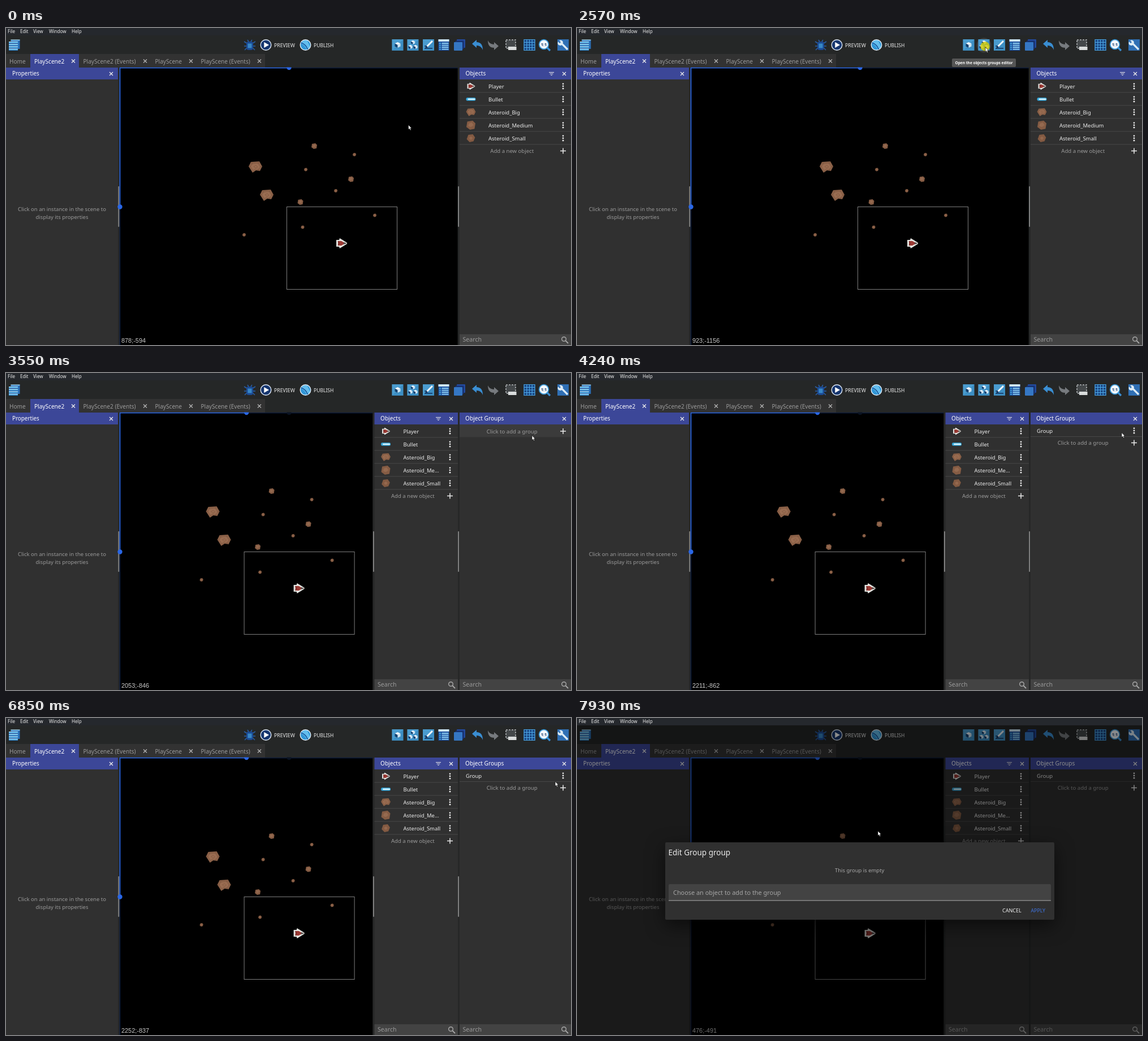
Recreate the animation shown at these times as an HTML page. Size 999 by 561 pixels, loop 8 s.

```html
<!DOCTYPE html>
<html lang="en">
<head>
<meta charset="utf-8">
<title>Scene editor</title>
<style>
html, body { margin: 0; width: 100%; height: 100%; overflow: hidden; background: #252727; }
svg { display: block; width: 999px; height: 561px; }
text { font-family: "Noto Sans", "Open Sans", sans-serif; white-space: pre; }
#coords { font-family: "Liberation Sans", Arial, sans-serif; }
</style>
</head>
<body>
<svg id="stage" viewBox="0 0 999 561" xmlns="http://www.w3.org/2000/svg"></svg>
<script>
const LOOP = 8000;
const WHITE = '#ececec', GREY = '#9b9b9b', PANEL = '#303030', GAP = '#272828', HEAD = '#3c4798';
const BLUE = '#2a67e6', RAIL = '#0d1c3c', SKY = '#4aa9e0', NAVY = '#1d3f8c';

// ---- drawing helpers ----
const rect = (x, y, w, h, fill, more = '') => `<rect x="${x}" y="${y}" width="${w}" height="${h}" fill="${fill}" ${more}/>`;
const circle = (x, y, r, fill, more = '') => `<circle cx="${x}" cy="${y}" r="${r}" fill="${fill}" ${more}/>`;
const shape = (d, fill, more = '') => `<path d="${d}" fill="${fill}" ${more}/>`;
const line = (d, color, w = 1.3, more = '') => `<path d="${d}" fill="none" stroke="${color}" stroke-width="${w}" ${more}/>`;
const text = (x, y, size, fill, s, more = '') => `<text x="${x}" y="${y}" font-size="${size}" fill="${fill}" ${more}>${s}</text>`;
const mid = (x, y, size, fill, s, more = '') => text(x, y, size, fill, s, `text-anchor="middle" ${more}`);
const at = (x, y, body, scale = 1) => `<g transform="translate(${x} ${y}) scale(${scale})">${body}</g>`;

const cross = (x, y, color = WHITE) => at(x, y, line('M-3-3 3 3M3-3-3 3', color));
const plus = (x, y) => at(x, y, line('M-5 0H5M0-5V5', WHITE, 1.5));
const dots = (x, y) => at(x, y, [-4.2, 0, 4.2].map(d => circle(0, d, 1.4, WHITE)).join(''));
const loupe = (x, y) => at(x, y, circle(-1.5, -1.5, 3.8, 'none', 'stroke="#aaa" stroke-width="1.4"') + line('M1.4 1.4 6 6', '#aaa', 1.8));
const filter = (x, y) => at(x, y, line('M-4.5-2.5H4.5M-3 0H3M-1.2 2.5H1.2', WHITE, 1.2));
const header = (x, w) => rect(x, 70, w, 21, HEAD);
const grip = x => rect(x, 280, 1.8, 72, '#8a8a8a', 'rx=".9"');

// ---- game sprites ----
const big = shape('M-8-9 7-10 12-1 8 7 1 6-5 10-12-1Z', '#8b6148') +
  shape('M-5-5 4-6 8 0 4 4 0 3-4 5-8-1Z', '#9a6d52') + line('M-8-9-5-5M7-10 4-6M12-1 8 0M-12-1-8-1M8 7 4 4', '#76503a', .8) +
  line('M-3-1 1-3 4 0 0 2Z', '#7f573f', .8);
const rock = shape('M-4-4 2-5 5-2 4 4-1 5-5 2Z', '#855c44') + shape('M-2-2 1-3 3 0 0 2-3 1Z', '#956a50');
const pebble = shape('M-2-2.6 1.5-3 3.2-.5 2 2.4-1 3-3.2.8Z', '#835a42') + circle(0, 0, 1.2, '#94684e');
const ship = shape('M-9-6-4-6-3-9 2-6 10-1V1L2 6-3 9-4 6-9 6Z', '#e4e4e0') + shape('M-6-4H0L7 0 0 4H-6Z', '#9c3a34') +
  line('M-6-4-4 0-6 4', '#5c2424', 1) + shape('M4-2 10 0 4 2Z', '#55504e');
const bullet = rect(-8.5, -2.8, 17, 5.6, '#35a8dc', 'rx="2.4"') + rect(-5.5, -1.3, 13, 2.6, '#def5ff', 'rx="1.3"');

const world =
  [[441, 246], [461, 296]].map(p => at(...p, big)).join('') +
  [[545, 209], [610, 267.5], [520.5, 308]].map(p => at(...p, rock)).join('') +
  [[616, 224], [530, 250.5], [583, 288], [652, 331.5], [524.5, 352.5], [421, 366]].map(p => at(...p, pebble)).join('') +
  rect(496.5, 316.5, 195, 146, 'none', 'stroke="#7e7e7e"') + at(593, 381, ship);

// ---- toolbar ----
const cube = (x, y, s) => at(x, y, shape('M0-4 4-2 0 0-4-2Z', '#f2f8fc') + shape('M-4-2 0 0V4L-4 2Z', '#17406e') + shape('M4-2 0 0V4L4 2Z', '#cfe4f2'), s);
const tile = rect(-10, -10, 20, 20, '#3d8fc4') + shape('M-10-10H10L-10 10Z', '#58a9da', 'opacity=".5"');
const tools = [
  [14.5, 30, rect(-6, -9, 16, 16, '#2a70ba') + rect(-9.5, -6, 16, 16, NAVY) + [-6, -1.8, 2.4, 6.6].map(y => rect(-9.5, y, 16, 3, SKY) + rect(-9.5, y, 16, 1, '#c4e8fa')).join('') + rect(-6, -9.5, 16, 1.6, '#9fd8f6')],
  [431, 30, line('M-10-6-5-3M10-6 5-3M-10 2H10M-9 9-5 5M9 9 5 5M-4-9-2-6M4-9 2-6', '#2a5fa8', 1.5) + rect(-6, -6, 12, 15, '#1b4a94', 'rx="4"') + rect(-3.5, -2.5, 7, 8, '#3787c6')],
  [459.5, 30, circle(0, 0, 9.3, '#16366f', 'stroke="#dfe9f5" stroke-width="1.4"') + shape('M-3.2-5 5.5 0-3.2 5Z', '#fff')],
  [529.5, 30, circle(0, 0, 9.3, '#2f95d6', 'stroke="#e4eef6" stroke-width="1.4"') + shape('M-8-3Q-4-9 3-8L8 3Q6 7 2 8Q-1 1-8-3Z', '#63bdec') + line('M-8-4Q1-1 4 8', '#17539c', 1.6)],
  [692.5, 30, tile + cube(0, 0, 1.25)],
  [719.5, 30, tile + cube(0, -4.5, .9) + cube(-4.5, 3.5, .9) + cube(4.5, 3.5, .9)],
  [747, 30, tile + line('M-7 6H7M-7 2H-2', '#12325e', 1.6) + line('M-3 3 7-7', '#f0f6fa', 3) + shape('M-6 6-4 1-1 4Z', '#12325e')],
  [774, 30, rect(-9.5, -10, 19, 20, '#1a4d9c') + rect(-9.5, -10, 19, 4, '#cfe9f8') + [-4, -.5, 3, 6.5].map(y => rect(-8, y, 3, 2, SKY) + rect(-3.5, y, 12, 2, '#8fd0f2')).join('')],
  [802, 30, rect(-5, -10, 15, 15, '#234a9e', 'rx="1"') + rect(-7.5, -7.5, 15, 15, '#16306e', 'rx="1"') + rect(-10, -5, 15, 15, '#3577c4', 'rx="1"')],
  [834, 30, shape('M-10-2-2-9V-5Q9-5 9 9Q6 1-2 1V5Z', '#3a8ed2')],
  [861, 30, shape('M10 2 2 9V5Q-9 5-9-8Q-6-1 2-1V-5Z', '#767a7e')],
  [893, 30, rect(-9, -9, 17, 15, '#44484a', 'stroke="#b4b8ba" stroke-width="1.5" stroke-dasharray="3 2"') + rect(-5, 3, 14.5, 6, '#d9dcdc')],
  [925.5, 30, rect(-10, -10, 20, 20, '#17427f') + line('M-10-9.5H10M-10-4.7H10M-10 0H10M-10 4.7H10M-10 9.5H10M-9.5-10V10M-4.7-10V10M0-10V10M4.7-10V10M9.5-10V10', '#4ba4e2', 1.2)],
  [952, 30, line('M5 5 10 10', '#3a8ed2', 3.4) + circle(-1, -1, 8.3, '#f4f8fb', 'stroke="#3a9ada" stroke-width="1.8"') + mid(-1, 1.8, 7.5, '#173a68', '1:1', 'font-weight="700"')],
  [985, 30, rect(-10, -10, 20, 20, '#2f6fb4') + line('M-2-2 8 8', '#dcebf5', 3.2) + shape('M0-5Q-2-10-7-8L-4-5-6-3-9-6Q-11 0-5 1Q-1 1 0-5Z', '#dcebf5')]
];

const menubar = [['File', 3], ['Edit', 25], ['View', 48], ['Window', 76], ['Help', 116]].map(([s, x]) => text(x, 9, 8.1, WHITE, s)).join('');
const tabs = [['PlayScene2 (Events)', 136.5, 246], ['PlayScene', 263.5, 327], ['PlayScene (Events)', 344.5, 448]]
  .map(([s, x, c]) => text(x, 62.5, 10.1, GREY, s) + cross(c, 58.5, '#b5b5b5')).join('');

const chrome = rect(0, 0, 999, 13, '#25282d') + rect(0, 13, 999, 57, '#252727') + menubar +
  rect(0, 46, 458, 24, '#323232') + rect(43, 46, 86, 24, HEAD) +
  text(6, 62.5, 10.1, GREY, 'Home') + text(50, 62.5, 10.1, '#fff', 'PlayScene2') + cross(119, 58.5) + tabs +
  `<circle id="hover" cx="719.5" cy="30.5" r="13" fill="#fff" opacity=".1"/>` +
  tools.map(([x, y, b]) => at(x, y, b)).join('') +
  text(474, 33.6, 8.75, WHITE, 'PREVIEW') + text(544, 33.6, 8.55, WHITE, 'PUBLISH');

const props = rect(0, 70, 198, 491, PANEL) + rect(198, 70, 3, 491, GAP) + header(0, 198) +
  text(11, 84.3, 9.85, '#fff', 'Properties') + cross(186, 81) +
  mid(99, 324.2, 9.5, GREY, 'Click on an instance in the scene to') + mid(99, 338.2, 9.5, GREY, 'display its properties') + grip(198.4);

const scene = `<clipPath id="view"><rect id="viewRect" x="197" y="69.5" height="492"/></clipPath><g clip-path="url(#view)">` +
  rect(201, 70, 620, 491, '#000') + `<g id="world">${world}</g>` +
  rect(201, 70, 620, 1.4, RAIL) + rect(200.7, 70, 1.6, 491, RAIL) +
  rect(200.7, 70, 1.6, 246, BLUE) + `<rect id="bar" x="201" y="69.7" height="1.6" fill="${BLUE}"/>` +
  `<circle id="ghost" cx="500.5" cy="70" r="4" fill="#0b1424"/><circle id="knob" cy="70" r="4.2" fill="${BLUE}"/>` +
  circle(201.5, 316.5, 4.2, BLUE) + `<text id="coords" x="204" y="557" font-size="10.9" fill="#cdcdcd"></text></g>`;

// ---- side panels ----
const names = ['Player', 'Bullet', 'Asteroid_Big', 'Asteroid_Medium', 'Asteroid_Small'];
const thumbs = [[ship, .72], [bullet, 1], [big, .7], [rock, 1.6], [pebble, 2.3]];
const rowY = i => 103 + 23 * i;
const objects = `<rect id="objGap" y="70" width="3.2" height="491" fill="${GAP}"/>` +
  `<g id="objBg">${rect(0, 70, 197, 491, PANEL)}${header(0, 197)}${rect(0, 542, 197, 19, '#434343')}` +
  names.map((_, i) => rect(0, rowY(i) + 10.5, 197, 1, '#474747')).join('') +
  text(10.5, 84.3, 10.1, '#fff', 'Objects') + text(5.5, 555, 10.6, GREY, 'Search') +
  names.map((n, i) => `<text id="name${i}" x="51" y="${rowY(i) + 3.5}" font-size="9.5" fill="${WHITE}">${n}</text>` + at(20, rowY(i), ...thumbs[i])).join('') + `</g>` +
  `<g id="objRight">${filter(964.5, 81)}${cross(987, 81)}${names.map((_, i) => dots(985, rowY(i))).join('')}${plus(985, 217.5)}${loupe(988, 552)}</g>` +
  `<text id="addObj" y="221" font-size="9.55" fill="${GREY}" text-anchor="middle">Add a new object</text>` + `<g id="objGrip">${grip(0)}</g>`;

const groups = `<g id="groups">${rect(799, 70, 3, 491, GAP)}${rect(802, 70, 197, 491, PANEL)}${header(802, 197)}` +
  `<rect id="rowHover" x="802" y="91" width="197" height="22.5" fill="#3b3b3b"/>` +
  text(812, 84.3, 10.15, '#fff', 'Object Groups') + cross(987, 81) +
  `<g id="groupRow">${text(813, 105.5, 9.5, WHITE, 'Group')}${dots(985, 102)}${rect(802, 112, 197, 1, '#474747')}</g>` +
  `<g id="addGroup">${mid(894.7, 106.5, 9.6, GREY, 'Click to add a group')}${plus(985, 103)}</g>` +
  rect(802, 542, 197, 19, '#434343') + text(807.5, 555, 10.6, GREY, 'Search') + loupe(988, 552) + grip(799.2) + `</g>`;

// ---- floating layers ----
const tip = `<g id="tip">${rect(663, 54, 113, 15, '#555', 'rx="2"')}${mid(719.5, 64.2, 6.6, '#fff', 'Open the objects groups editor', 'font-weight="600"')}</g>`;
const menu = `<g id="menu">${rect(890, 93, 108, 94, '#424242', 'rx="2"')}` +
  ['Edit group', 'Rename', 'Delete'].map((s, i) => text(902, 114 + 28 * i, 9.8, WHITE, s)).join('') + `</g>`;
const dialog = `<rect id="shade" y="13" width="999" height="548"/>` +
  `<g id="dialog"><g style="filter:drop-shadow(0 10px 16px rgba(0,0,0,.55))">${rect(156, 220, 688, 137, '#303030', 'rx="2"')}</g>` +
  text(161.5, 242.6, 13.5, WHITE, 'Edit Group group') + mid(499.7, 272.6, 9.45, '#a8a8a8', 'This group is empty') +
  rect(162, 294, 676, 29, '#434343', 'rx="2"') + rect(162, 322.5, 676, 1, '#b0b0b0') +
  text(170, 313.4, 10.9, '#a6a6a6', 'Choose an object to add to the group') +
  text(752, 343.6, 9.05, WHITE, 'CANCEL') + text(802.5, 343.6, 8.75, '#3f74e0', 'APPLY') + `</g>`;
const pointer = `<circle id="click" r="8.3" fill="#d6cc00" opacity=".8"/>` +
  `<g id="cursor">${shape('M0 0V8.2L1.9 6.6 3.2 9.6 4.7 9 3.4 6.1H5.8Z', '#fff', 'stroke="#000" stroke-width=".6"')}</g>`;

document.getElementById('stage').innerHTML = chrome + props + scene + objects + groups + tip + menu + dialog + pointer;

// ---- animation ----
const $ = id => document.getElementById(id);
const set = (id, attrs) => { for (const k in attrs) $(id).setAttribute(k, attrs[k]); };
const move = (id, x, y) => set(id, { transform: `translate(${x} ${y})` });
const show = (id, on) => set(id, { visibility: on ? 'visible' : 'hidden' });
const clamp = v => Math.max(0, Math.min(1, v));
const smooth = v => v * v * (3 - 2 * v);
// progress in n even jumps, the first at a and the last at b
const steps = (t, a, b, n) => clamp((Math.floor((t - a) / (b - a) * (n - 1) + 1e-6) + 1) / n);

// start, end, jumps, then pointer x, y and the coordinates read out
const moves = [
  [720, 1350, 10, 722, 34, 923, -1156],
  [3130, 3550, 7, 930, 110.5, 2053, -846],
  [3620, 3830, 4, 963, 105.5, 2211, -862],
  [5440, 5650, 4, 984.7, 104.5, 2307, -868],
  [6570, 7180, 9, 952, 123.5, 2174, -793],
  [7250, 7930, 10, 532, 200, 476, -491]
];
const clicks = [[2570, 2710, 721.5, 32.5], [4100, 4240, 963, 105], [5790, 5930, 984, 104], [6290, 6500, 985, 102.5]];

function draw(t) {
  let pos = [711.5, 171.5, 878, -594];
  for (const [a, b, n, ...to] of moves) {
    const k = smooth(steps(t, a, b, n));
    pos = pos.map((v, i) => v + (to[i] - v) * k);
  }
  const [x, y, u, v] = pos;
  move('cursor', x, y);
  $('coords').textContent = Math.round(u) + ';' + Math.round(v);
  show('hover', Math.hypot(x - 719.5, y - 30) < 14);

  const hit = clicks.find(([a, b]) => t >= a && t < b);
  show('click', hit);
  if (hit) set('click', { cx: hit[2], cy: hit[3] });

  // the panel opens first, the scene is laid out again a moment later
  const split = t >= 2710, shifted = t >= 2780, added = t >= 4170;
  const edge = shifted ? 648.5 : split ? 651.5 : 798.8;
  move('world', shifted ? -75.4 : 0, 0);
  set('viewRect', { width: edge - 197 });
  const knob = split ? 425.2 : 500.5;
  set('knob', { cx: knob });
  set('bar', { width: knob - 201 });
  show('ghost', split);

  set('objGap', { x: edge });
  move('objBg', split ? 651.5 : 802, 0);
  move('objRight', split ? -200 : 0, 0);
  move('objGrip', split ? 649 : 799.2, 0);
  set('addObj', { x: split ? 719.3 : 894.7 });
  $('name3').textContent = split ? 'Asteroid_Me...' : names[3];

  show('groups', split);
  show('rowHover', split && !added && x > 802 && y > 91 && y < 114);
  show('groupRow', added);
  move('addGroup', 0, added ? 20.5 : 0);

  set('tip', { opacity: steps(t, 1620, 1760, 3) - steps(t, 3130, 3270, 3) });
  set('menu', { opacity: steps(t, 5930, 6140, 4) - steps(t, 6500, 6640, 3) });
  const fade = smooth(steps(t, 7110, 7390, 5));
  set('shade', { opacity: fade * .45 });
  set('dialog', { opacity: fade });
}

function tick() {
  draw(performance.now() % LOOP);
  requestAnimationFrame(tick);
}
tick();
</script>
</body>
</html>
```
